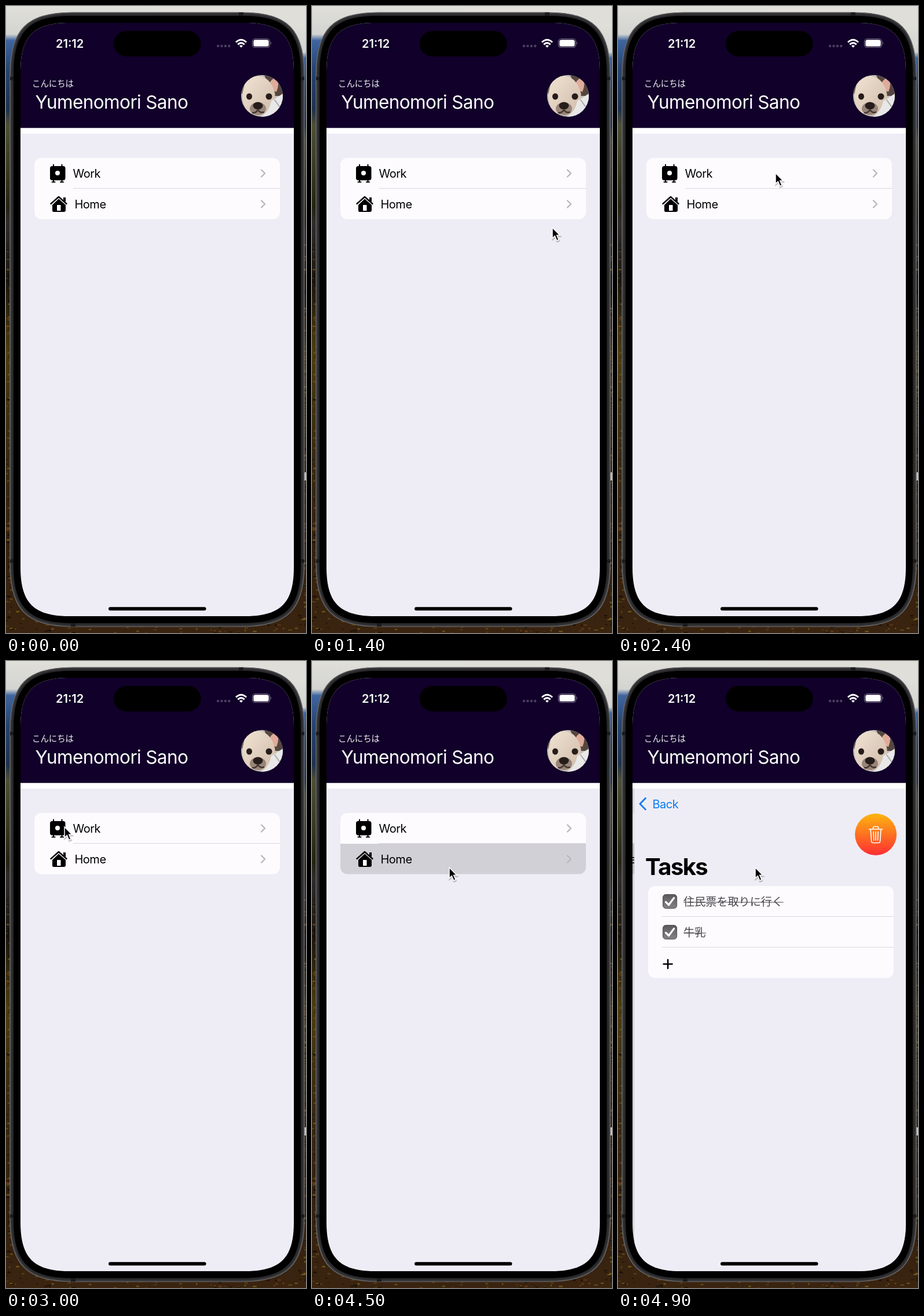
Write an HTML page that moves like this. It is 518 px wide and 1081 px high and loops after 5000 ms.

```html
<!DOCTYPE html>
<html lang="ja">
<head>
<meta charset="utf-8">
<title>Tasks</title>
<style>
  html, body { margin: 0; width: 100%; height: 100%; overflow: hidden; background: #2a1d10; }
  svg { display: block; width: 100vw; height: 100vh; }
  text { font: 20px Inter, sans-serif; letter-spacing: -.5px; }
  .jp { font-family: "Noto Sans CJK JP", "Noto Sans CJK", sans-serif; font-weight: 300; letter-spacing: 0; }
  .task { font-size: 19.1px; fill: #48474b; }
  .line { fill: none; stroke-linecap: round; stroke-linejoin: round; }
</style>
</head>
<body>
<svg viewBox="0 0 518 1081" preserveAspectRatio="none">
  <defs>
    <linearGradient id="land" x2="0" y2="1">
      <stop offset="0" stop-color="#e0dfd9"/><stop offset=".045" stop-color="#d3d4d1"/>
      <stop offset=".055" stop-color="#3f659f"/><stop offset=".1" stop-color="#264573"/>
      <stop offset=".165" stop-color="#1e3150"/><stop offset=".19" stop-color="#4d4f34"/>
      <stop offset=".26" stop-color="#393a21"/><stop offset=".32" stop-color="#25230f"/>
      <stop offset=".345" stop-color="#302b2a"/><stop offset=".44" stop-color="#1b150d"/>
      <stop offset=".55" stop-color="#4b3d10"/><stop offset=".7" stop-color="#392a11"/>
      <stop offset=".85" stop-color="#33210f"/><stop offset="1" stop-color="#3a2410"/>
    </linearGradient>
    <linearGradient id="sun" x2="0" y2="1">
      <stop offset=".05" stop-color="#fdaf10"/><stop offset="1" stop-color="#ff2d33"/>
    </linearGradient>
    <linearGradient id="boxFill" x2="0" y2="1">
      <stop offset="0" stop-color="#5b595c"/><stop offset="1" stop-color="#858386"/>
    </linearGradient>
    <linearGradient id="fur" x2="1" y2="1">
      <stop offset="0" stop-color="#f0e3d3"/><stop offset="1" stop-color="#d0bba9"/>
    </linearGradient>
    <clipPath id="screen"><path id="screenShape"/></clipPath>
    <clipPath id="round"><circle cx="442" cy="155" r="36"/></clipPath>
    <path id="chevron" class="line" d="M441 282.5l6 6-6 6" stroke="#b9b8bd" stroke-width="2.4"/>
    <g id="checkbox">
      <rect x="74.5" y="402.5" width="24" height="24" rx="5" fill="url(#boxFill)" stroke="#4b494c"/>
      <path class="line" d="M79.5 415.5l5 5 9-12" stroke="#fff" stroke-width="3.2"/>
    </g>
  </defs>

  <rect width="518" height="1081" fill="url(#land)"/>
  <rect x="259" width="259" height="40" fill="#dfded9"/>
  <rect x="259" y="32" width="259" height="1049" fill="url(#land)"/>
  <g id="leaves"></g>
  <rect x="515" y="804" width="3" height="14" fill="#c9c6c0"/>

  <path id="frame" fill="#29292b" stroke="#77777a" stroke-width="1.2"/>
  <path id="frameEdge" fill="none" stroke="#3c3c3f" stroke-width="1.5"/>
  <path d="M402 11h8v6h-8zM7 122h6v6h-6zM509 122h6v6h-6zM7 954h6v6h-6zM509 954h6v6h-6zM112 1064h8v6h-8z" fill="#1b1b1d"/>
  <path id="bezel"/>

  <g clip-path="url(#screen)">
    <rect x="25" y="29" width="472" height="1023" fill="#eeedf6"/>

    <g id="lists">
      <rect x="49" y="262" width="424" height="105.5" rx="12" fill="#fdfbfe"/>
      <path id="pressed" d="M49 315h424v40.5a12 12 0 0 1-12 12H61a12 12 0 0 1-12-12z" fill="#d1d0d6"/>
      <path d="M116 314.5h357" stroke="#d8d7dc"/>
      <rect x="76" y="276" width="26.5" height="24.5" rx="4"/>
      <path class="line" d="M82 273.5v4M96.500 273.5v4M82 300v3M96.500 300v3M79.500 303.5h5M94 303.5h5" stroke="#000" stroke-width="2"/>
      <circle cx="89" cy="288" r="4" fill="#fff"/>
      <path class="line" d="M77.500 341l13.500-12 13.500 12" stroke="#000" stroke-width="2.4"/>
      <path d="M99 330h4v8l-4-3.500zM91 332.500l12 10.500v9q0 3-3 3H82q-2 0-2-3v-9z"/>
      <rect x="88" y="343" width="6.5" height="10" rx=".5" fill="#fff"/>
      <text x="115.500" y="296">Work</text>
      <text x="118.500" y="349">Home</text>
      <use href="#chevron"/><use href="#chevron" y="53"/>
    </g>
    <rect id="dim" x="25" y="220" width="472" height="832"/>

    <g id="tasks">
      <rect x="25" y="220" width="472" height="832" fill="#eeedf6"/>
      <text x="44" y="369" style="font-size:40px;font-weight:700;letter-spacing:-1.6px">Tasks</text>
      <circle cx="442" cy="299" r="36" fill="url(#sun)"/>
      <path class="line" d="M430.500 290h23M437.500 290v-2.500q0-2 2-2h5q2 0 2 2v2.500M433 290l1.500 20.500q.2 3 3 3h9q2.800 0 3-3L451 290M438 294.500l.6 14.500M442 294.500v14.500M446 294.500l-.6 14.500" stroke="#fff" stroke-width="1.6"/>
      <rect x="49" y="388" width="424" height="158.5" rx="12" fill="#fdfbfe"/>
      <path d="M73 440.500h400M73 493.500h400" stroke="#d8d7dc"/>
      <use href="#checkbox"/><use href="#checkbox" y="53"/>
      <text class="jp task" x="110" y="421.500">住民票を取りに行く</text>
      <text class="jp task" x="110" y="474.500">牛乳</text>
      <path d="M110 416h172.500M110 469h39" stroke="#48474b" stroke-width="1.2"/>
      <path class="line" d="M75.500 522.500h15M83 515v15" stroke="#000" stroke-width="2.6"/>
    </g>

    <g id="back">
      <path class="line" d="M47.500 236.500l-9.500 9.800 9.500 9.800" stroke="#0a7bf2" stroke-width="2.8"/>
      <text x="59.500" y="253.500" fill="#0a7bf2">Back</text>
    </g>

    <rect x="25" y="29" width="472" height="181.5" fill="#110029"/>
    <rect x="25" y="210.500" width="472" height="9.5" fill="#fff"/>
    <rect x="186" y="43" width="150.5" height="44" rx="22"/>
    <text x="86" y="71.500" fill="#fff" style="font-weight:600;letter-spacing:0">21:12</text>
    <path class="line" d="M366 69h.1M372.400 69h.1M378.800 69h.1M385.200 69h.1" stroke="#493d60" stroke-width="4.4"/>
    <path d="M397 62.500q9-8.500 18 0M400.300 66.300q5.700-5.500 11.400 0" fill="none" stroke="#fff" stroke-width="3"/>
    <path d="M403 68.800q3-2.600 6 0l-3 3z" fill="#fff"/>
    <rect x="425.500" y="56.500" width="30" height="15" rx="4.7" fill="none" stroke="#7b728b" stroke-width="1.2"/>
    <rect x="427.300" y="58.300" width="26.4" height="11.4" rx="3.3" fill="#fff"/>
    <path d="M457 61.500q2 2.500 0 5z" fill="#7b728b"/>
    <text class="jp" x="45" y="139" fill="#f3f0f8" style="font-size:14.4px">こんにちは</text>
    <text x="50.500" y="176.500" fill="#fff" style="font-size:31.5px;letter-spacing:-.6px">Yumenomori Sano</text>

    <g clip-path="url(#round)">
      <path d="M406 119h72v72h-72z" fill="#c4c0ba"/>
      <path d="M406 119h22l-18 32h-4z" fill="#6e6558"/>
      <path d="M446 119h32v36h-18z" fill="#55463f"/>
      <path d="M452 143q3-18 16-20 5 10-1 25z" fill="#dfab9b"/>
      <path d="M410 143q4-22 21-22 22-2 32 24 5 15-4 28-10 16-23 15-19 0-25-17-5-15-1-28z" fill="url(#fur)"/>
      <path d="M458 164l20-13v40h-38q14-8 18-27z" fill="#e8e8e8"/>
      <path d="M464 162l10 14-13 12" class="line" stroke="#aaaaae" stroke-width="2"/>
      <ellipse cx="435" cy="177" rx="14" ry="11" fill="#98857a"/>
      <ellipse cx="420" cy="156" rx="5" ry="5.5" fill="#261c1a"/>
      <ellipse cx="454" cy="156" rx="5.500" ry="5.5" fill="#261c1a"/>
      <ellipse cx="435" cy="172" rx="8.500" ry="6.5" fill="#261d1b"/>
      <path class="line" d="M426 184q5 1 9-5 4 6 10 4" stroke="#44362f" stroke-width="2.5"/>
    </g>
    <rect x="177" y="1036.200" width="168.5" height="6" rx="3"/>
  </g>

  <g id="cursor">
    <path d="M0 0V18.500L4.300 14.600 7.600 22.400 11 21 7.700 13.300H13z" transform="translate(.6 2)" opacity=".22" stroke="#000" stroke-width="2.5"/>
    <path d="M0 0V18.500L4.300 14.600 7.600 22.400 11 21 7.700 13.300H13z" stroke="#fff" stroke-width="1.5"/>
  </g>
</svg>

<script>
const LOOP = 5000, STEP = 100, WIDTH = 472;
const PRESS = 4400, PUSH = 4513, STIFFNESS = 0.0184;
// Pointer stops: time, x, y
const STOPS = [[900, 512, 455], [1400, 415, 382], [2400, 272, 288], [3000, 101, 286], [4000, 237, 356]];
const byId = id => document.getElementById(id);
const shift = (id, x, y = 0) => byId(id).setAttribute('transform', `translate(${x} ${y})`);
const fade = (id, value) => byId(id).setAttribute('opacity', value);

// Rectangle with continuous-curvature corners, grown outwards from the screen
function squircle(id, grow) {
  const left = 25 - grow, right = 497 + grow, top = 29 - grow, bottom = 1052 + grow;
  const radius = 66 + grow, far = radius * 1.28, near = radius * 0.345;
  byId(id).setAttribute('d', `M${left + far} ${top}H${right - far}
    C${right - near} ${top} ${right} ${top + near} ${right} ${top + far}V${bottom - far}
    C${right} ${bottom - near} ${right - near} ${bottom} ${right - far} ${bottom}H${left + far}
    C${left + near} ${bottom} ${left} ${bottom - near} ${left} ${bottom - far}V${top + far}
    C${left} ${top + near} ${left + near} ${top} ${left + far} ${top}z`);
}

let seed = 7;
const random = () => (seed = seed * 16807 % 2147483647) / 2147483647;

function growLeaves() {
  const colors = ['#8d761c', '#120d06', '#8a5020', '#0d0904', '#6a591d'];
  let markup = '';
  for (let i = 0; i < 420; i++) {
    const ground = i % 3 === 2;
    const x = ground ? random() * 518 : random() * 8 + i % 3 * 510;
    const y = ground ? 1035 + random() * 46 : 400 + random() * 680;
    markup += `<rect x="${x}" y="${y}" width="${2 + random() * 5}" height="${1 + random() * 2}" fill="${colors[i % 5]}" opacity=".6"/>`;
  }
  byId('leaves').innerHTML = markup;
}

function pointerAt(time) {
  const next = STOPS.findIndex(stop => stop[0] > time);
  if (next < 0) return STOPS[STOPS.length - 1].slice(1);
  const [t0, x0, y0] = STOPS[next - 1], [t1, x1, y1] = STOPS[next];
  const u = (time - t0) / (t1 - t0), eased = u * u * (3 - 2 * u);
  return [x0 + (x1 - x0) * eased, y0 + (y1 - y0) * eased];
}

// Critically damped spring from 0 to 1
function pushProgress(time) {
  const phase = Math.max(0, time - PUSH) * STIFFNESS;
  return 1 - (1 + phase) * Math.exp(-phase);
}

function draw(now) {
  const time = Math.floor(now % LOOP / STEP) * STEP;
  const progress = pushProgress(time);
  shift('lists', -0.3 * WIDTH * progress);
  shift('tasks', WIDTH * (1 - progress));
  fade('dim', 0.115 * progress);
  fade('back', Math.min(1, progress * 1.2));
  fade('pressed', time >= PRESS ? 1 : 0);
  const visible = time >= STOPS[0][0];
  fade('cursor', visible ? 1 : 0);
  if (visible) shift('cursor', ...pointerAt(time));
}

squircle('screenShape', 0);
squircle('bezel', 12);
squircle('frameEdge', 16);
squircle('frame', 18);
growLeaves();
const start = performance.now();
(function tick() {
  draw(performance.now() - start);
  requestAnimationFrame(tick);
})();
</script>
</body>
</html>
```
